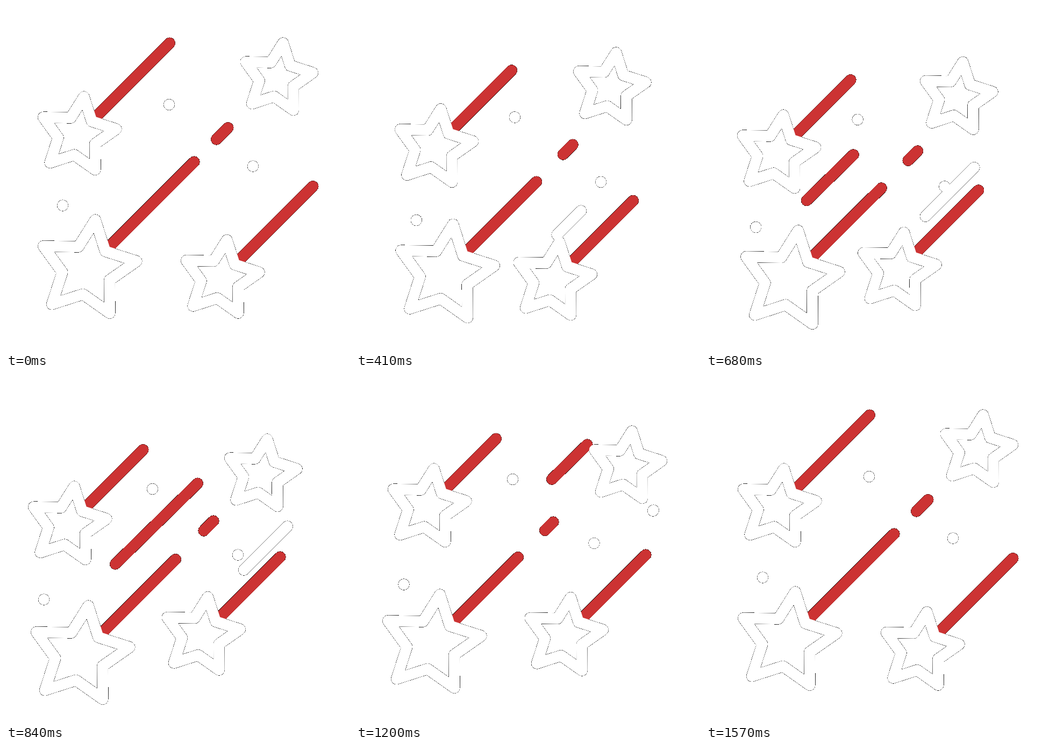
Write an HTML page with a canvas that moves like this. It is 640 px wide and 640 px high and loops after 1640 ms.

```html
<!DOCTYPE html>
<html lang="en">
<head>
<meta charset="utf-8">
<title>Shooting stars</title>
<style>
  html, body { margin: 0; height: 100%; overflow: hidden; background: #fff; }
  canvas { display: block; }
</style>
</head>
<body>
<canvas id="stage" width="640" height="640"></canvas>
<script>
const SIZE = 640, LOOP = 1640, RED = '#cc3333', WHITE = '#fff';
const ctx = document.getElementById('stage').getContext('2d', { willReadFrequently: true });

// Pose times; the pose at the end equals the first one.
const TIMES = [40, 220, 560, 840, 960, 1200, 1570];
const STAR = [[0, 38], [51, 39], [75.5, 0], [90, 45.5], [135.5, 60],
  [96.2, 87.5], [96.5, 135.5], [57.5, 108], [12.5, 122.5], [27.5, 76]];

// dx, dy: drift from the home place; tail: horizontal reach of the red tail.
const stars = [
  { x: 69.5, y: 169, scale: 1, base: [162, 211.5],
    dx: [0, 10, 10, -18, -12.5, 0], dy: [0, 10, 31, 33, 19, 0],
    tail: [142.5, 128.5, 107, 111, 97.5, 98.5] },
  { x: 69.5, y: 398, scale: 1.28, base: [188, 452],
    dx: [0, 8, 14.5, -13, -24, -10], dy: [0, 2, 14, 26, 19, 5],
    tail: [162, 145, 128.5, 140.5, 126.5, 123.5] },
  { x: 335.5, y: 435.5, scale: 1, base: [430, 476.5],
    dx: [0, -14, -43, -35.5, -26, -11.5], dy: [0, 10, -5, -28, -36, -27],
    tail: [141, 117, 121, 115.5, 109.5, 120.5] },
  { x: 446, y: 69, scale: 0.92,
    dx: [0, -16.5, -39, -29.5, -18.5, -2], dy: [0, 6.5, 27.5, 45, 45.5, 30] }
];

const dots = [
  { x: [303.5, 301.5, 289, 272.5, 268, 291.5], y: [183.5, 196.5, 212, 206.5, 201, 188.5] },
  { x: [459.5, 458, 451.5, 431.5, 426, 443], y: [298, 311, 336.5, 329, 321, 307.5] },
  { x: [105.5, 112.5, 106.5, 70.5, 64.5, 89], y: [371, 384, 408, 412, 404.5, 384] }
];

const dash = {
  x: [391.5, 391, 379.5, 368, 345.5, 351.5],
  y: [248, 258.5, 287, 284, 289, 283.5],
  reach: [21.5, 19.5, 17.5, 18, 17.5, 15.5]
};

// Streaks slide along fixed lines between their first and last times.
const streaks = [
  { color: RED, times: [470, 560, 840, 960, 1200, 1350], line: x => 370 - (x - 179) * 0.98,
    from: [176, 179, 203.5, 235.5, 364.5, 440], to: [177, 212.5, 356.5, 402, 430, 441] },
  { color: WHITE, times: [220, 560, 840, 960, 1200], line: x => 799.5 - x,
    from: [365.5, 390, 442.5, 488.5, 552.5], to: [368, 474, 523.5, 534, 553.5] }
];

// Smooth Hermite curve through the values, at rest at both ends.
function curve(times, values, t) {
  const last = times.length - 1;
  let i = 0;
  while (i < last - 1 && t >= times[i + 1]) i++;
  const slope = k => k === 0 || k === last ? 0
    : (values[k + 1] - values[k - 1]) / (times[k + 1] - times[k - 1]);
  const span = times[i + 1] - times[i], s = (t - times[i]) / span, r = 1 - s;
  return r * r * (1 + 2 * s) * values[i] + s * s * (3 - 2 * s) * values[i + 1]
    + span * s * r * (r * slope(i) - s * slope(i + 1));
}

const pose = (values, t) => curve(TIMES, [...values, values[0]], t);

function stroke(points, color, closed) {
  ctx.strokeStyle = color;
  ctx.beginPath();
  points.forEach(([x, y]) => ctx.lineTo(x, y));
  if (closed) ctx.closePath();
  ctx.stroke();
}

function drawStreaks(color, t) {
  for (const s of streaks) {
    if (s.color !== color || t < s.times[0] || t > s.times[s.times.length - 1]) continue;
    const a = curve(s.times, s.from, t), b = curve(s.times, s.to, t);
    stroke([[a, s.line(a)], [b, s.line(b)]], color);
  }
}

// Partly covered pixels darken, which gives the shapes their hairline rim.
function hardenEdges() {
  const image = ctx.getImageData(0, 0, SIZE, SIZE), px = image.data;
  for (let i = 0; i < px.length; i += 4) {
    const alpha = px[i + 3];
    if (alpha === 255) continue;
    for (let c = i; c < i + 3; c++) px[c] = alpha < 30 ? 255 : px[c] * alpha / 255;
    px[i + 3] = 255;
  }
  ctx.putImageData(image, 0, 0);
}

function draw(t) {
  ctx.clearRect(0, 0, SIZE, SIZE);
  ctx.lineWidth = 20.5;
  ctx.lineCap = ctx.lineJoin = 'round';

  const placed = stars.map(s => ({ ...s, ox: pose(s.dx, t), oy: pose(s.dy, t) }));
  for (const s of placed) {
    if (!s.tail) continue;
    const x = s.base[0] + s.ox, y = s.base[1] + s.oy, reach = pose(s.tail, t);
    stroke([[x, y], [x + reach, y - reach]], RED);
  }
  const x = pose(dash.x, t), y = pose(dash.y, t), reach = pose(dash.reach, t);
  stroke([[x, y], [x + reach, y - reach]], RED);
  drawStreaks(RED, t);

  drawStreaks(WHITE, t);
  ctx.fillStyle = WHITE;
  for (const d of dots) {
    ctx.beginPath();
    ctx.arc(pose(d.x, t), pose(d.y, t), 10.3, 0, 7);
    ctx.fill();
  }
  for (const s of placed) {
    stroke(STAR.map(([px, py]) => [s.x + s.ox + px * s.scale, s.y + s.oy + py * s.scale]), WHITE, true);
  }
  hardenEdges();
}

// Steps of 30 ms, with a 70 ms hold every 490 ms and at the loop's ends.
function stepped(t) {
  const phase = (t + 270) % 490;
  const start = t - (phase < 70 ? phase : (phase - 10) % 30);
  return t < 70 ? TIMES[0] : Math.min(start, 1570);
}

let shown;
function tick() {
  const t = stepped(performance.now() % LOOP);
  if (t !== shown) draw(shown = t);
  requestAnimationFrame(tick);
}
tick();
</script>
</body>
</html>
```
